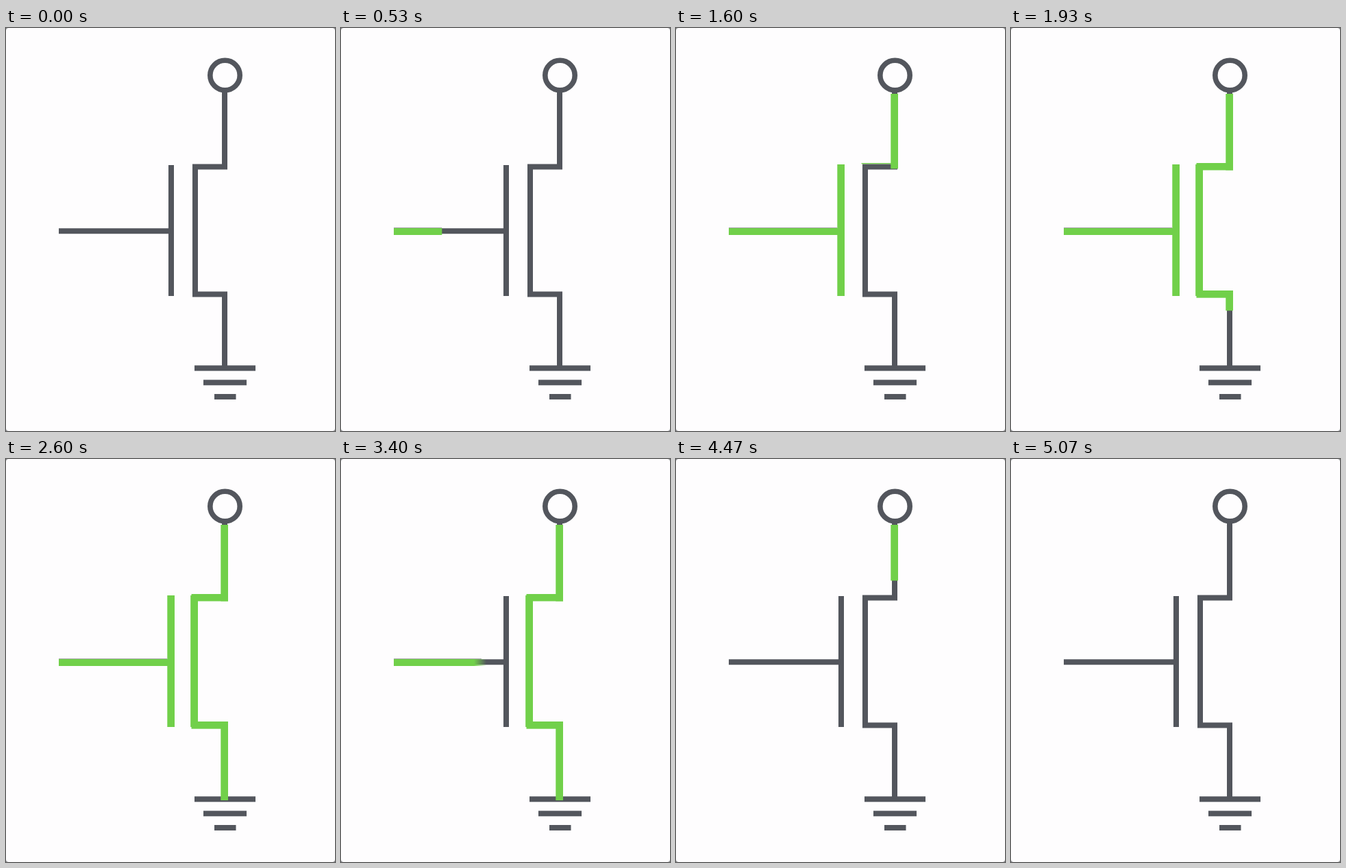
Write an HTML page with a canvas that moves like this. It is 480 px wide and 588 px high and loops after 6.07 s.

```html
<!DOCTYPE html>
<html lang="en">
<head>
<meta charset="utf-8">
<title>Transistor switching</title>
<style>
  html, body { margin: 0; width: 100%; height: 100%; overflow: hidden; background: #85858a; }
  canvas { display: block; border-radius: 4px; background: #fefdfe; }
</style>
</head>
<body>
<canvas id="stage" width="480" height="588"></canvas>
<script>
const ctx = document.getElementById('stage').getContext('2d');
const LOOP = 6070, STEP = 1000 / 15;
const DARK = '#53565d', GREEN = '#71d04a', CLEAR = 'rgba(113,208,74,0)';
const GATE_ARM = 164, GATE_HALF = 96, GATE_LENGTH = GATE_ARM + GATE_HALF;
const TOP = 96, BOTTOM = 498;

const clamp = (v, lo = 0, hi = 1) => Math.min(hi, Math.max(lo, v));
const progress = (n, start, end) => clamp((n - start) / (end - start));

// Fills the box between two corners
function box(x1, y1, x2, y2, color) {
  if (x2 <= x1 || y2 <= y1) return;
  ctx.fillStyle = color;
  ctx.fillRect(x1, y1, x2 - x1, y2 - y1);
}

function drawCircuit() {
  ctx.strokeStyle = DARK;
  ctx.lineWidth = 7.6;
  ctx.beginPath();
  ctx.arc(319.5, 69, 21.7, 0, 2 * Math.PI);
  ctx.stroke();
  ctx.lineWidth = 8;
  ctx.stroke(new Path2D('M319 92V202.5H276V388.5H319V494M77 296.2H241M241 200V391'));
  box(275, 492.3, 364, 500.3, DARK);
  box(288, 513.3, 351, 521.3, DARK);
  box(304, 534, 335.5, 542, DARK);
}

// The charge runs along the arm, then spreads up and down the plate
function drawGate(n) {
  const leaving = n > 42;
  const charge = clamp(leaving ? GATE_LENGTH - 1.63 * (n - 42) ** 2 : 37 * (n - 6.1), 0, GATE_LENGTH);
  if (!charge) return;
  const half = charge - GATE_ARM;
  const end = 77 + Math.min(charge, GATE_ARM);
  let color = GREEN, reach = end;
  if (leaving && half <= 0) {
    color = ctx.createLinearGradient(end - 11, 0, end + 7, 0);
    color.addColorStop(0, GREEN);
    color.addColorStop(1, CLEAR);
    reach = end + 7;
  }
  box(77, 291, Math.min(end, 235), 292, '#a5a5a8');
  box(77, 292, reach, 302, color);
  if (half > 0) box(235.3, 295 - half, 246, 295 + half, GREEN);
}

// A level sweeps down to fill the channel, and back up to empty it
function drawChannel(n) {
  const fill = progress(n, 21.61, 31);
  const drain = 1 - (1 - progress(n, 60, 70)) ** 1.4;
  const level = TOP + (BOTTOM - TOP) * (fill - drain);
  if (level <= TOP) return;
  const part = (x1, y1, x2, y2, lead = 0) => box(x1, y1, x2, Math.min(y2, level + lead), GREEN);
  part(313.3, TOP, 324, 207.5, 7);
  part(270.5, 197, 324, 207.5);
  part(269.2, 199, 280, 391);
  part(270.5, 383, 324, 393.7);
  part(313.3, 383, 324, BOTTOM);
}

function draw(now) {
  const n = Math.floor((now % LOOP + 5) / STEP);
  ctx.clearRect(0, 0, 480, 588);
  drawCircuit();
  drawGate(n);
  drawChannel(n);
}

const begin = performance.now();
function tick() {
  draw(performance.now() - begin);
  requestAnimationFrame(tick);
}
tick();
</script>
</body>
</html>
```
